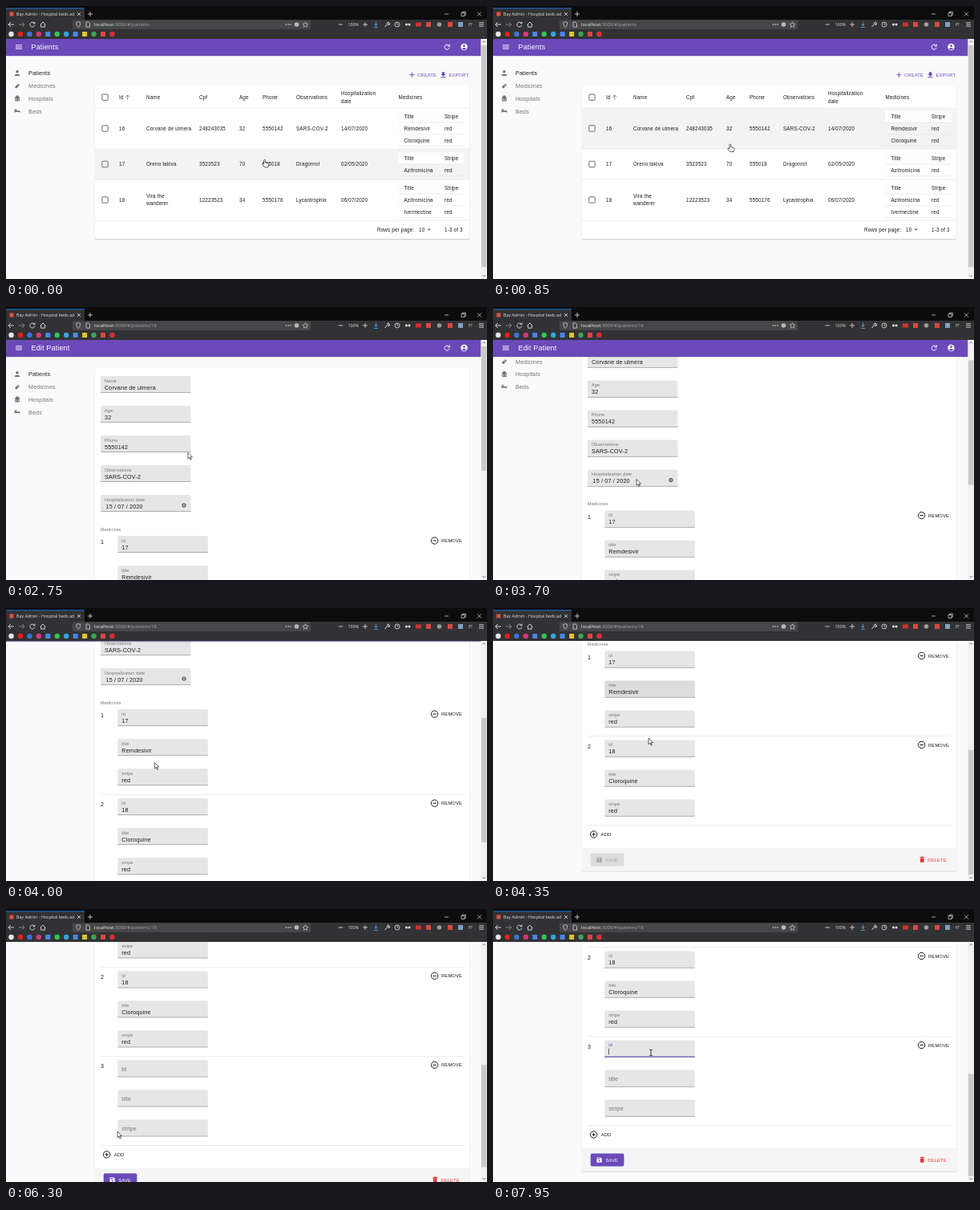
An HTML page for the animation above (8000 ms loop, 600 px wide and 340 px high).

```html
<!DOCTYPE html>
<html lang="en">
<head>
<meta charset="utf-8">
<title>Hospital beds</title>
<style>
  html, body { margin: 0; width: 100%; height: 100%; overflow: hidden; background: #fafafa; }
  svg { display: block; width: 600px; height: 340px; font-family: "Liberation Sans", Arial, sans-serif; letter-spacing: .01em; }
  .ui { font-family: "Open Sans", "Noto Sans", sans-serif; letter-spacing: 0; }
  .btn { letter-spacing: .022em; }
</style>
</head>
<body>
<svg id="stage" viewBox="0 0 600 340"></svg>
<script>
const LOOP = 8000, PURPLE = '#6b49b9', INK = '#1c1c1c', GREY = '#737373', PAGE = '#fafafa';
const OPEN_AT = 1750, ADD_AT = 5700, FOCUS_AT = 7450;
const ITEM_TOP = 285, ITEM_STEP = 111;

// SVG builders; text is placed by its vertical centre
const text = (x, y, s, size = 6.3, fill = INK, cls = '') =>
  `<text x="${x}" y="${y + size * .36}" font-size="${size}" fill="${fill}" class="${cls}">${s}</text>`;
const rect = (x, y, w, h, fill, rx = 0, extra = '') =>
  `<rect x="${x}" y="${y}" width="${w}" height="${h}" fill="${fill}" rx="${rx}" ${extra}/>`;
const dot = (x, y, r, fill, extra = '') => `<circle cx="${x}" cy="${y}" r="${r}" fill="${fill}" ${extra}/>`;
const line = (d, color, width = 1, extra = '') =>
  `<path d="${d}" fill="none" stroke="${color}" stroke-width="${width}" ${extra}/>`;
const shape = (d, fill, extra = '') => `<path d="${d}" fill="${fill}" ${extra}/>`;
const group = (id, body) => `<g id="${id}">${body}</g>`;
const rule = (x, y, w) => rect(x, y - .25, w, .6, '#e0e0e0');
const button = (x, y, s, fill = INK) => text(x, y, s, 5.85, fill, 'btn');

function browserChrome() {
  const W = '#e4e4e6';
  let s = rect(0, 0, 600, 41, '#323234') + rect(0, 0, 600, 17, '#0c0c0d') +
    rect(0, 2.5, 98, 14.5, '#323234') + rect(0, 2.5, 98, .8, '#0a84ff');
  s += rect(4.5, 7.5, 5, 5, '#e0533d') +
    `<svg width="85" height="17">${text(13, 10, 'Bay Admin - Hospital beds adm', 5.3, W, 'ui')}</svg>`;
  s += line('M89 8l4 4m0-4l-4 4M102 10h6m-3-3v6', W, .8);
  s += line('M547 10h5M588 7.5l5 5m0-5l-5 5M568 8.5h4v4h-4zM569.3 8.5v-1.3h4v4h-1.3', W, .7);
  // navigation bar
  s += line('M10 23H3m3-3l-3 3 3 3', W, .9) + line('M16 23h7m-3-3l3 3-3 3', '#8b8b8e', .9);
  s += line('M35.3 21.2a3 3 0 1 0 .6 2.6M36 19.6v2.2h-2.2', W, .9);
  s += line('M42.7 23.3l3.3-3.3 3.3 3.3M43.7 22.8v3.4h4.6v-3.4', W, .9);
  s += rect(83, 17.5, 297, 11.5, '#474749', 1.2);
  s += line('M87.8 20.5l2.4-.9 2.4.9c0 3-.6 4.7-2.4 5.9-1.8-1.2-2.4-2.9-2.4-5.9z', W, .7);
  s += line('M100 20h3l1.5 1.5v4.7h-4.5z', W, .7);
  s += `<text x="110" y="25.1" font-size="5.8" class="ui" fill="#a9a9ad"><tspan fill="#f5f5f6">localhost</tspan>:3000/#/patients<tspan id="urlTail">/16</tspan></text>`;
  s += [349.5, 352.2, 354.9].map(x => dot(x, 23, .8, W)).join('') + dot(362.5, 23, 2.8, '#b8b8bb');
  s += line('M373.5 19.8l1 2.2 2.4.3-1.8 1.6.5 2.4-2.1-1.2-2.1 1.2.5-2.4-1.8-1.6 2.4-.3z', W, .6);
  s += line('M414.5 23h5.5M445 23h6m-3-3v6', W, .8) + text(426.5, 23, '100%', 5.2, W, 'ui');
  s += line('M461.5 19.5v5m-2-2l2 2 2-2m-4.5 4h5', '#4aa3ff', .9);
  s += line('M472.5 26l3-3.2m-.2-.3a1.8 1.8 0 0 1 2.4-2.2l-1 1.2 1 1 1-.8a1.8 1.8 0 0 1-2.4 1.6', W);
  s += dot(488, 23, 3, 'none', `stroke="${W}" stroke-width=".8"`) + line('M488 21v2h1.5', W, .7);
  s += dot(499.5, 23, 1.5, W) + dot(503, 23, 1.5, W);
  s += rect(511, 20.5, 7, 5, '#d0312d') + rect(524, 20, 6, 6, '#d9483f') + dot(540.5, 23, 2.8, '#9a9a9d') +
    rect(551, 20, 6, 6, '#d9483f') + rect(564, 20, 6, 6, '#7f9fc4');
  s += text(577, 23, 'f?', 6, W, 'ui') + line('M590 20.8h6m-6 2.2h6m-6 2.2h6', W, .8);
  // bookmarks
  ['#e8e8ea', '#e62117', '#3b74d8', '#d4387a', '#4a86e8', '#2fc558', '#35a5de', '#4a86e8', '#e3c52c', '#38a455', '#d9483f', '#d93036']
    .forEach((c, i) => {
      const x = 6.5 + i * 11.45;
      s += [4, 7, 8, 10].includes(i) ? rect(x - 3, 32, 6, 6, c) : dot(x, 35, 3.2, c);
    });
  return s;
}

function appBar() {
  return rect(0, 41, 592.5, 22, '#000', 0, 'opacity=".12"') + rect(0, 41, 592.5, 21, PURPLE) +
    line('M12 48.8h8m-8 2.2h8m-8 2.2h8', '#fff', .9) +
    group('titleList', text(31.5, 51, 'Patients', 9, '#fff')) +
    group('titleEdit', text(31.5, 51, 'Edit Patient', 9, '#fff')) +
    line('M552.6 49.3a3 3 0 1 0 .5 2.5M553.3 47.5v2.5h-2.5', '#fff') +
    dot(571.5, 51, 4.2, '#fff') + dot(571.5, 49.7, 1.4, PURPLE) + shape('M568.8 53.2q2.7-2.6 5.4 0q-2.7 2.6-5.4 0', PURPLE);
}

function sidebar() {
  const c = '#6e6e6e';
  return ['Patients', 'Medicines', 'Hospitals', 'Beds'].map((s, i) =>
      text(28, 83.6 + i * 15.8, s, 7.2, i ? GREY : INK)).join('') +
    dot(14, 81.7, 1.7, c) + shape('M10.8 87v-1q3.2-2.6 6.4 0v1z', c) +
    line('M12.7 101l2.6-2.6', c, 2.8, 'stroke-linecap="round"') + dot(14.7, 99, .7, PAGE) +
    rect(11.3, 113, 5.5, 5.5, c) + rect(12.5, 111.5, 3, 3, c) + line('M12.7 115v2.5m2.6-2.5v2.5', PAGE, .8) +
    rect(10.8, 130.3, 6.5, 1.7, c) + dot(12.3, 129.3, 1, c) + line('M11 128.5v4.5m6-2v2', c, .6);
}

function card(top, bottom) {
  const h = bottom - top;
  return rect(110.5, top, 468, h + 1, '#000', 2, 'opacity=".07"') + rect(111, top + .8, 467, h + .5, '#000', 2, 'opacity=".1"') +
    rect(111, top, 467, h, '#fff', 2);
}

const checkbox = y => rect(119.8, y - 3.7, 7.4, 7.4, 'none', .8, 'stroke="#5f5f5f" stroke-width=".9"');

function patientList() {
  const columns = [141, 175, 241, 291, 320, 362, 418];
  const patients = [
    [127, 178, ['16', 'Corvane de ulmera', '248243035', '32', '5550142', 'SARS-COV-2', '14/07/2020'], ['Remdesivir', 'Cloroquine']],
    [178, 216, ['17', 'Oreno takiva', '3523523', '70', '555018', 'Dragonrot', '02/05/2020'], ['Azitromicina']],
    [216, 267, ['18', 'Vira the|wanderer', '12223523', '34', '5550176', 'Lycantrophia', '06/07/2020'], ['Azitromicina', 'Ivermectine']]
  ];
  const cell = (x, y, s, gap = 9) => {
    const parts = s.split('|');
    return parts.map((p, i) => text(x, y + (i - (parts.length - 1) / 2) * gap, p)).join('');
  };
  let s = line('M503.5 85.7h6m-3-3v6', PURPLE, .9) + button(513, 85.7, 'CREATE', PURPLE) +
    shape('M544 82.2h3v2.6h1.7l-3.2 3-3.2-3h1.7zM542.3 88.3h6.4v1h-6.4z', PURPLE) + button(552.5, 85.7, 'EXPORT', PURPLE);
  s += card(100, 290) + checkbox(113.7);
  ['Id', 'Name', 'Cpf', 'Age', 'Phone', 'Observations', 'Hospitalization|date'].forEach((h, i) => s += cell(columns[i], 113.5, h, 10));
  s += text(489.5, 113.5, 'Medicines') + line('M151.7 116.5v-5.5m-2.5 2.5l2.5-2.5 2.5 2.5', '#666', .8) + rule(111, 127, 467);
  patients.forEach(([top, bottom, cells, meds], r) => {
    const mid = (top + bottom) / 2, tableTop = mid - (meds.length + 1) * 7.4;
    s += rect(111, top, 467, bottom - top, '#f3f3f3', 0, `id="row${r}"`) + checkbox(mid);
    cells.forEach((c, i) => s += cell(columns[i], mid, c));
    s += rect(489, tableTop, 82.5, 14.8, '#fdfdfd');
    [['Title', 'Stripe'], ...meds.map(m => [m, 'red'])].forEach((pair, i) => {
      const y = tableTop + i * 14.8;
      s += text(496.5, y + 7.5, pair[0]) + text(547, y + 7.5, pair[1]) + rule(489, y + 14.8, 82.5);
    });
    s += rule(111, bottom, 467);
  });
  return s + text(463, 278.5, 'Rows per page:') + text(515, 278.5, '10') +
    shape('M525.5 277.5h4.4l-2.2 2.3z', '#666') + text(547, 278.5, '1-3 of 3');
}

function field(x, y, label, value, id) {
  const box = shape(`M${x} ${y + 21}v-19q0-2 2-2h108.5q2 0 2 2v19z`, '#e6e6e6', id && `id="${id}Box"`) +
    rect(x, y + 20.4, 112.5, .6, '#858585');
  const caption = value === undefined
    ? `<text id="${id}Label" x="${x + 5}" y="${y + 13.5}" font-size="7.2" fill="${GREY}">${label}</text>`
    : text(x + 5, y + 5.6, label, 5.4, GREY) + text(x + 5, y + 14, value, 7.2);
  return box + caption;
}

function medicine(n, values = []) {
  const y = ITEM_TOP + (n - 1) * ITEM_STEP;
  return text(118, y + 7.5, n, 7.2) +
    ['id', 'title', 'stripe'].map((label, i) => field(139.3, y + i * 37, label, values[i], `${label}${n}`)).join('') +
    dot(534.6, y + 6, 4.2, 'none', `stroke="${INK}"`) + line(`M532.4 ${y + 6}h4.4`, INK) +
    button(543, y + 6, 'REMOVE') + rule(118, y + 106.2, 454);
}

function editForm() {
  const rows = [['Name', 'Corvane de ulmera'], ['Age', '32'], ['Phone', '5550142'], ['Observations', 'SARS-COV-2'], ['Hospitalization date', '']];
  const dateY = 86 + 4 * 37, b = ITEM_TOP + ITEM_STEP, y3 = b + ITEM_STEP;
  let s = card(76, 900) + rows.map(([l, v], i) => field(118, 86 + i * 37, l, v)).join('');
  s += text(124.5, dateY + 14, '15 / 07 / 2020', 7.2) + dot(222, dateY + 13, 2.7, '#6b6b6b') +
    line(`M221 ${dateY + 12}l2 2m0-2l-2 2`, '#e6e6e6', .7);
  s += text(118, 276.7, 'Medicines', 5.4, GREY);
  s += medicine(1, ['17', 'Remdesivir', 'red']) + medicine(2, ['18', 'Cloroquine', 'red']);
  s += group('item3', medicine(3) + group('focus',
    rect(139.3, y3 + 20, 112.5, 1, PURPLE, 0, 'id="focusLine"') + rect(144.3, y3 + 10.3, .7, 7.5, '#222', 0, 'id="caret"')));
  return s + group('foot',
    rect(105, b + 163, 485, 250, PAGE) + rect(111, b + 163, 467, 1, '#000', 0, 'opacity=".16"') +
    rect(111, b + 134.5, 467, 28.5, '#f5f5f5') +
    group('addHover', rect(118, b + 109.5, 32.5, 16, '#f3f2f7', 2) + dot(138, b + 117, 8, '#000', 'id="ripple" clip-path="url(#addClip)"')) +
    dot(125.6, b + 117.5, 4.2, 'none', `stroke="${INK}"`) + line(`M123.4 ${b + 117.5}h4.4m-2.2-2.2v4.4`, INK) +
    button(134.7, b + 117.5, 'ADD') +
    rect(121.7, b + 141, 41.7, 16, '#dcdcdc', 2, 'id="saveBox"') +
    group('saveInk', shape(`M129.5 ${b + 146}h4.7l1.5 1.5v4.7h-6.2z`, 'currentColor') +
      rect(130.4, b + 146.8, 3, 1.3, 'var(--hole)') + dot(132.6, b + 150.3, 1, 'var(--hole)') + button(140.3, b + 149.2, 'SAVE', 'currentColor')) +
    shape(`M533 ${b + 147}h4.6v5.3h-4.6zM532.3 ${b + 145.7}h6v.9h-6zM534.2 ${b + 145}h2.2v1h-2.2z`, '#e53935') +
    button(542.3, b + 149.2, 'DELETE', '#e53935'));
}

const cursors =
  group('arrow', shape('M0 0v7.6l1.8-1.6 1.3 2.9 1.2-.5-1.3-2.8h2.5z', '#fff', 'stroke="#222" stroke-width=".7"')) +
  group('hand', shape('M-.3.8q.9-1 1.8 0v3.2l3.3.8q1.3.4 1 1.8l-.8 3.2h-4.6l-2.9-3.8q.3-1.2 1.4-.5l.8.7z', '#fff', 'stroke="#222" stroke-width=".7"')) +
  group('beam', line('M-1.8-3.5h1.5l.3.3.3-.3h1.5M0-3.3v6.6M-1.8 3.5h1.5l.3-.3.3.3h1.5', '#222', .9));

document.getElementById('stage').innerHTML =
  `<clipPath id="addClip">${rect(118, ITEM_TOP + ITEM_STEP + 109.5, 32.5, 16, '#000', 2)}</clipPath>` +
  rect(0, 0, 600, 340, PAGE) + group('side', sidebar()) + group('list', patientList()) + group('edit', editForm()) +
  group('bar', appBar()) + rect(592.5, 41, 7.5, 299, '#f0f0f0') + rect(593, 49, 6.5, 155, '#c9c9c9', 0, 'id="thumb"') +
  line('M594.5 45.3l1.8-1.8 1.8 1.8M594.5 335.2l1.8 1.8 1.8-1.8', '#606060', .9) +
  browserChrome() + group('cursor', cursors);

const el = id => document.getElementById(id);
const set = (id, attrs) => { for (const k in attrs) el(id).setAttribute(k, attrs[k]); };
const show = (id, on) => set(id, { display: on ? 'inline' : 'none' });
const move = (id, x, y) => set(id, { transform: `translate(${x} ${y})` });
const clamp01 = v => Math.max(0, Math.min(1, v));
const smooth = v => v * v * (3 - 2 * v);
const linear = v => v;

// Value of a track of [time, ...values] at t
function track(keys, t, ease) {
  const i = keys.findIndex(k => k[0] > t);
  if (i < 0) return keys[keys.length - 1].slice(1);
  if (i === 0) return keys[0].slice(1);
  const a = keys[i - 1], b = keys[i], p = ease((t - a[0]) / (b[0] - a[0]));
  return a.slice(1).map((v, j) => v + (b[j + 1] - v) * p);
}

const pointer = [[0, 322, 191], [350, 322, 191], [1350, 268.7, 152.5], [2250, 268.7, 152.5], [3300, 179, 214.5], [3800, 179, 214.5],
  [4250, 194, 162], [4600, 194, 162], [5350, 137, 278], [5800, 137, 278], [6100, 139, 277], [6400, 139, 277], [7250, 197, 179]];
const scrolling = [[3600, 0], [3700, 31], [3850, 100], [4050, 178], [4200, 218], [4350, 231.5], [4400, 232.5],
  [6050, 232.5], [6180, 280], [6300, 318.5], [6400, 338], [6480, 343.5]];

function render(t) {
  const editing = t >= OPEN_AT, added = t >= ADD_AT;
  const [x, y] = track(pointer, t, smooth), [scroll] = track(scrolling, t, linear);

  show('list', !editing); show('edit', editing);
  show('titleList', !editing); show('titleEdit', editing);
  show('urlTail', t >= 1650);
  show('row0', y < 178); show('row1', y >= 178); show('row2', false);

  move('edit', 0, -scroll); move('side', 0, -scroll);
  move('bar', 0, -24 * smooth(clamp01((t - 3850) / 200)));
  set('thumb', { y: 49 + scroll * (added ? .456 : .553), height: added ? 127 : editing ? 155 : 276 });

  set('title1Box', { fill: t > 4050 && t < 4500 ? '#dcdcdc' : '#e6e6e6' });
  show('item3', added);
  set('item3', { opacity: clamp01((t - ADD_AT) / 500) ** 2 });
  move('foot', 0, added ? ITEM_STEP : 0);
  set('saveBox', { fill: added ? PURPLE : '#dcdcdc' });
  set('saveInk', { style: added ? `color:#fff;--hole:${PURPLE}` : 'color:#a3a3a3;--hole:#dcdcdc' });
  show('addHover', t > 5250 && !added);
  set('ripple', { r: 8 + clamp01((t - 5550) / 300) * 20, opacity: t >= 5500 ? .2 : 0 });

  const focus = smooth(clamp01((t - FOCUS_AT) / 200)), y3 = ITEM_TOP + 2 * ITEM_STEP;
  set('id3Label', { 'font-size': 7.2 - 1.8 * focus, y: y3 + 13.5 - 6 * focus, fill: t >= FOCUS_AT ? PURPLE : GREY });
  show('focus', t >= FOCUS_AT);
  set('focusLine', { x: 139.3 + 56.25 * (1 - focus), width: 112.5 * focus });
  show('caret', (t - FOCUS_AT) % 1060 < 530);

  const overField = t > 6400 && x > 140 && y > 163 && y < 258 && (y - 163) % 37 < 21;
  const overLink = !editing || (t > 5250 && !added);
  move('cursor', x, y);
  show('hand', overLink); show('beam', overField); show('arrow', !overLink && !overField);
}

const start = performance.now();
function tick() {
  render((performance.now() - start) % LOOP);
  requestAnimationFrame(tick);
}
tick();
</script>
</body>
</html>
```
